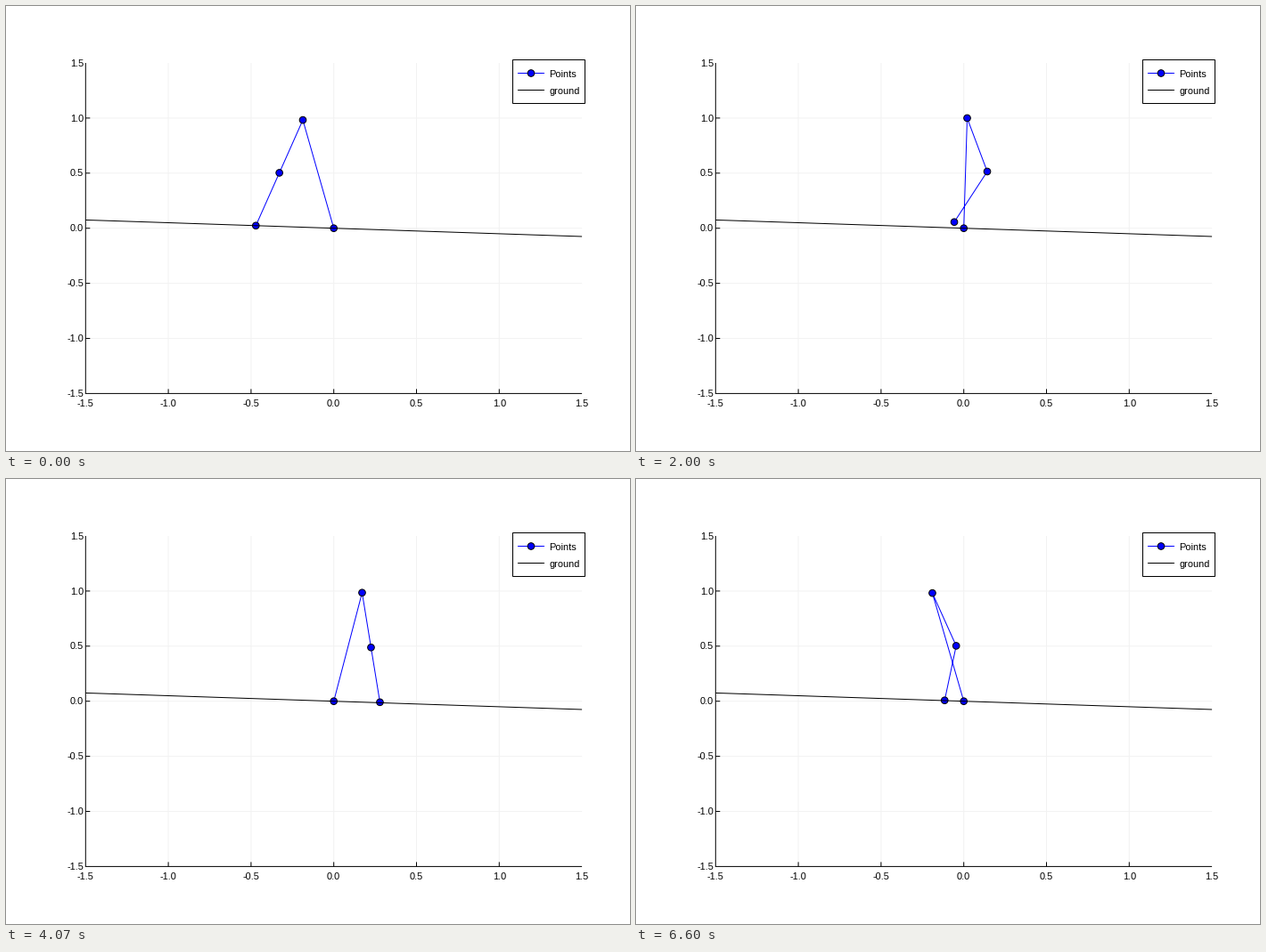
Animation of 700 by 500 pixels, one loop 6670 ms. Source, as a matplotlib script:

```python
import matplotlib.pyplot as plt
import numpy as np
from matplotlib.animation import FuncAnimation
from matplotlib.patches import Circle, Rectangle

W, H, DPI = 700, 500, 100
PX = 72 / DPI
FRAMES, STEP_MS = 290, 23
FPS, LAST_POSE = 15, 99  # the walk itself advances at this slower rate
X0, Y0, UX, UY = 367.7, 249.7, 185.6, 123.8  # data origin and unit, in pixels
SLOPE = 0.05
KNEE_LOCK, HEEL_STRIKE = 42, 62


def smooth(*poses):
    """Polynomial through poses (time, stance, thigh, shank angle)."""
    t, *angles = np.array(poses).T
    curves = [np.polyfit(t - t[0], a, len(t) - 1) for a in angles]
    return lambda now: [np.polyval(c, now - t[0]) for c in curves]


swing = smooth((0, -.188, -.288, -.288), (11, -.092, -.179, -.421),
               (18, -.047, -.022, -.537), (30, .0205, .245, -.41),
               (KNEE_LOCK, .0845, .358, .358))

# The knee locks: thigh and shank move as one.
lean, leg, _ = swing(KNEE_LOCK)
locked = smooth((KNEE_LOCK, lean, leg, leg), (48, .115, .3265, .3265),
                (HEEL_STRIKE, .176, .0825, .0825))

# The heel strikes: the legs trade roles.
lean, leg, _ = locked(HEEL_STRIKE)
fall = smooth((HEEL_STRIKE, -leg, -lean, -lean), (75, -.0835, -.126, -.358),
              (84, -.107, .012, -.489), (99, -.191, .292, -.14))


def to_px(x, y):
    return X0 + UX * x, Y0 - UY * y


def joints(t):
    """Stance foot, hip, knee and swing foot in pixels."""
    phase = swing if t < KNEE_LOCK else locked if t <= HEEL_STRIKE else fall
    lean, thigh, shank = phase(t)
    hip = np.array([np.sin(lean), np.cos(lean)])
    knee = hip + .5 * np.array([np.sin(thigh), -np.cos(thigh)])
    foot = knee + .5 * np.array([np.sin(shank), -np.cos(shank)])
    return [to_px(*p) for p in ((0, 0), hip, knee, foot)]


plt.rcParams["font.family"] = "Liberation Sans"
fig = plt.figure(figsize=(W / DPI, H / DPI), dpi=DPI, facecolor="white")
ax = fig.add_axes([0, 0, 1, 1])
ax.set(xlim=(0, W), ylim=(H, 0))
ax.axis("off")


def line(xs, ys, color="black", z=2):
    return ax.plot(xs, ys, color=color, lw=PX, zorder=z, snap=False,
                   solid_capstyle="butt")[0]


def label(x, y, text, align):
    ax.text(x, y, text, fontsize=11 * PX, ha=align, va="baseline", zorder=8)


def dot(x, y, z):
    return ax.add_patch(Circle((x, y), 3.8, fc="blue", ec="black",
                               lw=PX, zorder=z))


left, top = to_px(-1.5, 1.5)
right, bottom = to_px(1.5, -1.5)

for v in np.linspace(-1.5, 1.5, 7):
    x, y = to_px(v, v)
    label(x, 450.5, f"{v:.1f}", "center")
    label(87, y + 3.6, f"{v:.1f}", "right")
    if abs(v) < 1.5:
        line([x, x], [top, bottom], "#f2f2f2", 1)
        line([left, right], [y, y], "#f2f2f2", 1)
        line([x, x], [bottom - 5, bottom])
        line([left, left + 5], [y, y])
line([left, left], [top, bottom + .5])
line([left, right], [bottom, bottom])

line([left, right], [Y0 - 1.5 * SLOPE * UY, Y0 + 1.5 * SLOPE * UY], z=5)

ax.add_patch(Rectangle((568.5, 60.5), 81, 49, fc="white", ec="black",
                       lw=PX, snap=False, zorder=6))
for y, name, color in ((75.5, "Points", "blue"), (94.5, "ground", "black")):
    line([574, 604], [y, y], color, 7)
    label(609, y + 4.5, name, "left")
dot(589, 75.5, 8)

legs = line([], [], "blue", 3)
dots = [dot(X0, Y0, 4) for _ in range(4)]


def draw(i):
    pose = min(int((i + 1) * STEP_MS * FPS / 1000), LAST_POSE)
    pts = joints(pose)
    legs.set_data(*zip(*pts))
    for d, p in zip(dots, pts):
        d.center = p
    return [legs, *dots]


anim = FuncAnimation(fig, draw, frames=FRAMES, interval=STEP_MS,
                     repeat=True, repeat_delay=0)
plt.show()
```
